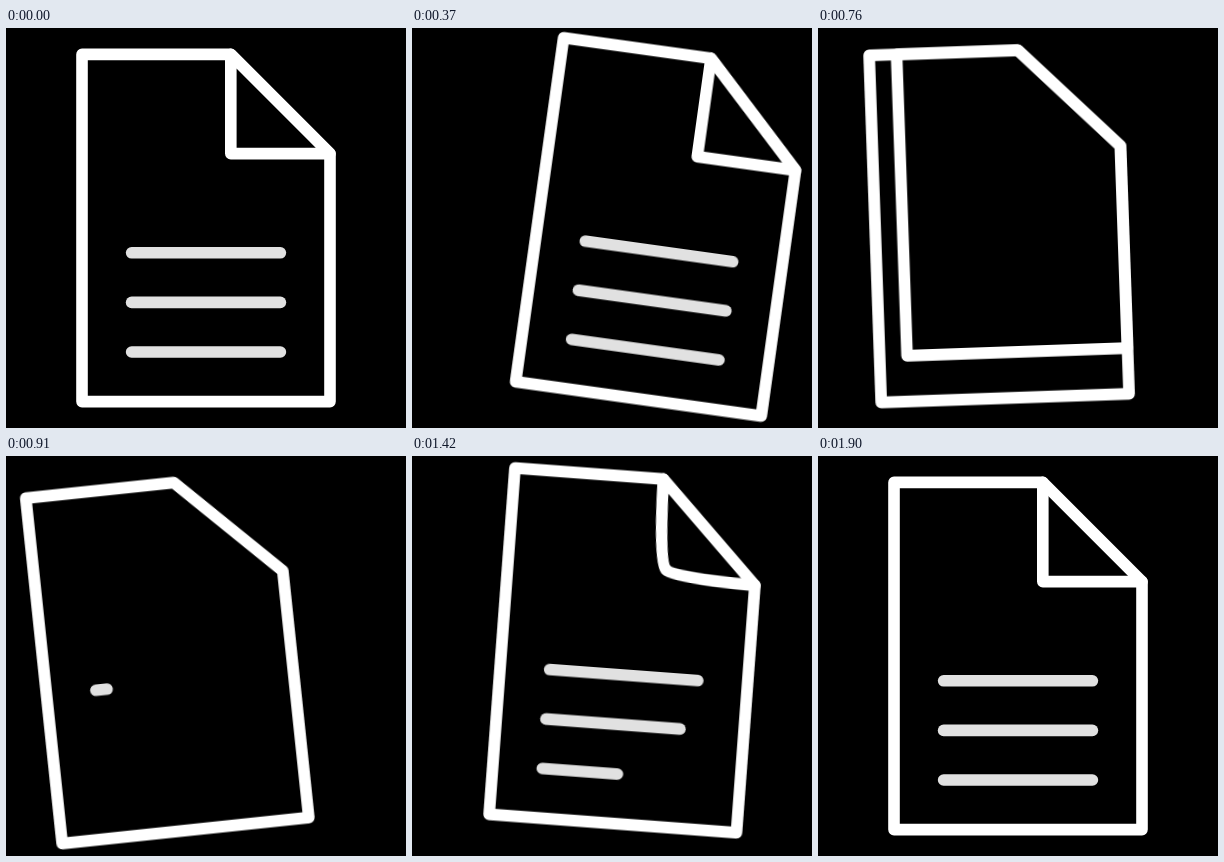
These frames come from a looping animation (400x400 px, 1.93 s). An HTML page without scripts:

```html
<!DOCTYPE html>
<html lang="en">
<head>
<meta charset="utf-8">
<title>Document</title>
<style>
html, body { margin: 0; width: 100%; height: 100%; overflow: hidden; background: #000; }
svg { display: block; width: 100%; height: 100%; }
path { fill: none; stroke: #fff; stroke-width: 11.6; stroke-linecap: round; stroke-linejoin: round; }
g, path { animation: 1930ms linear infinite; }

/* Page swing */
.sway { animation-name: sway; }
.bob { animation-name: bob; }
.tilt { animation-name: tilt; transform-origin: 200px 200px; }
@keyframes sway {
  0%, 6.74% { transform: none; animation-timing-function: cubic-bezier(.3, 0, .3, 1); }
  24.87% { transform: translateX(55px); animation-timing-function: cubic-bezier(.36, 0, .38, 1); }
  50.26% { transform: translateX(-40px); animation-timing-function: cubic-bezier(.37, 0, .63, 1); }
  76.17% { transform: translateX(15px); animation-timing-function: cubic-bezier(.36, 0, .5, 1); }
  98.45%, 100% { transform: none; }
}
@keyframes bob {
  0%, 6.74% { transform: none; animation-timing-function: ease-in-out; }
  22.28% { transform: translateY(-1.2px); animation-timing-function: ease-in-out; }
  34.72% { transform: translateY(-4.6px); animation-timing-function: ease-in-out; }
  51.81%, 59.07% { transform: translateY(3px); animation-timing-function: ease-in-out; }
  74.61% { transform: translateY(-5.7px); animation-timing-function: ease-in-out; }
  98.45%, 100% { transform: none; }
}
@keyframes tilt {
  0%, 6.74% { transform: rotate(0deg); animation-timing-function: cubic-bezier(.3, 0, .3, 1); }
  25.91% { transform: rotate(8.9deg); animation-timing-function: cubic-bezier(.36, 0, .38, 1); }
  51.81%, 53.89% { transform: rotate(-6.5deg); animation-timing-function: cubic-bezier(.37, 0, .63, 1); }
  79.79% { transform: rotate(5.9deg); animation-timing-function: cubic-bezier(.3, 0, .4, 1); }
  98.45%, 100% { transform: rotate(0deg); }
}

/* Text lines: covered by the turning page, then written again */
.line { stroke: #e1e1e1; stroke-dasharray: 148.8 400; }
.l1 { animation-name: write1; }
.l2 { animation-name: write2; }
.l3 { animation-name: write3; }
@keyframes write1 {
  0%, 45.6% { stroke-dashoffset: 0; animation-timing-function: steps(1, start); }
  46.32% { stroke-dashoffset: 150; animation-timing-function: cubic-bezier(.333, 1, .667, 1); }
  77.4%, 100% { stroke-dashoffset: 0; }
}
@keyframes write2 {
  0%, 45.6% { stroke-dashoffset: 0; animation-timing-function: steps(1, start); }
  56.79% { stroke-dashoffset: 150; animation-timing-function: cubic-bezier(.333, 1, .667, 1); }
  87.88%, 100% { stroke-dashoffset: 0; }
}
@keyframes write3 {
  0%, 45.6% { stroke-dashoffset: 0; animation-timing-function: steps(1, start); }
  67.05% { stroke-dashoffset: 150; animation-timing-function: cubic-bezier(.333, 1, .667, 1); }
  98.13%, 100% { stroke-dashoffset: 0; }
}

/* Page turning over */
.turn { fill: #000; animation-name: turn, leave; }
@keyframes turn {
  0%, 24.87% {
    d: path("M224.8 26.4L224.8 125.6L324 125.6L324 125.6L224.8 26.4Z");
    animation-timing-function: ease-in-out;
  }
  45.6%, 100% { d: path("M76 26.4L76 373.6L324 373.6L324 125.6L224.8 26.4Z"); }
}
@keyframes leave {
  0%, 46.2% { visibility: visible; }
  46.21%, 100% { visibility: hidden; }
}

/* New corner curling in */
.curl { animation-name: curl, enter; }
@keyframes curl {
  0%, 47.36% {
    d: path("M224.8 26.4C224.8 26.4 229.4 31 274.4 76C319.4 121 324 125.6 324 125.6");
    animation-timing-function: ease-in-out;
  }
  84.82%, 100% {
    d: path("M224.8 26.4C224.8 26.4 224.8 125.6 224.8 125.6C224.8 125.6 324 125.6 324 125.6");
  }
}
@keyframes enter {
  0%, 47.35% { visibility: hidden; animation-timing-function: step-end; }
  47.36%, 100% { visibility: visible; }
}
</style>
</head>
<body>
<svg viewBox="0 0 400 400">
  <g class="sway"><g class="bob"><g class="tilt">
    <path class="line l1" d="M125.6 224.8H274.4"/>
    <path class="line l2" d="M125.6 274.4H274.4"/>
    <path class="line l3" d="M125.6 324H274.4"/>
    <path class="turn" d="M224.8 26.4L224.8 125.6L324 125.6L324 125.6L224.8 26.4Z"/>
    <path class="curl" d="M224.8 26.4C224.8 26.4 224.8 125.6 224.8 125.6C224.8 125.6 324 125.6 324 125.6"/>
    <path d="M76 26.4H224.8L324 125.6V373.6H76Z"/>
  </g></g></g>
</svg>
</body>
</html>
```
